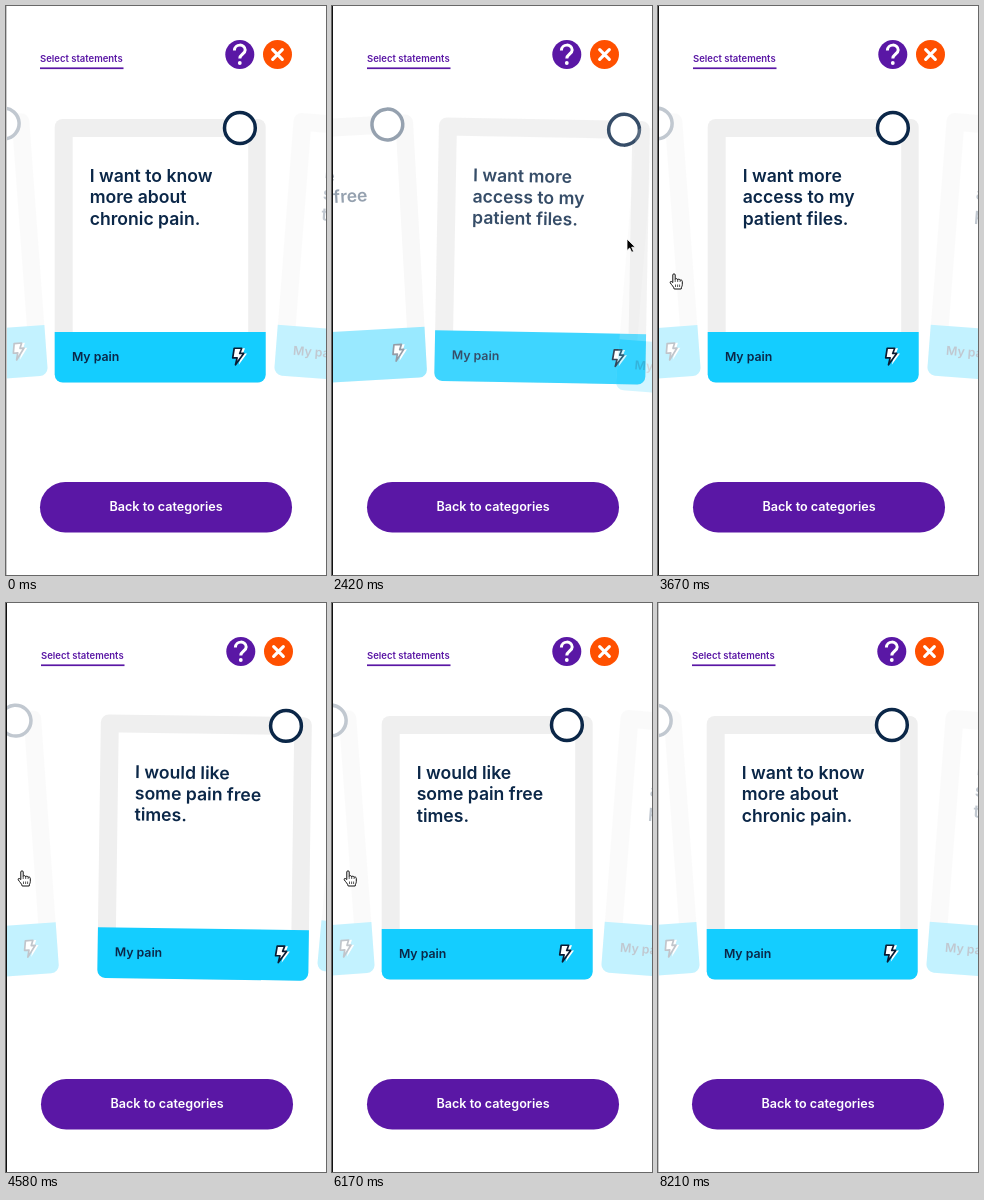
Write an HTML page that moves like this. It is 320 px wide and 569 px high and loops after 9000 ms.

```html
<!DOCTYPE html>
<html lang="en">
<head>
<meta charset="utf-8">
<title>Statement cards</title>
<style>
  html, body { margin: 0; width: 100%; height: 100%; overflow: hidden; background: #fff; }
  svg { display: block; width: 100vw; height: 100vh; }
  text { font-family: Inter, Roboto, sans-serif; font-weight: 600; }
</style>
</head>
<body>
<svg viewBox="0 0 320 569">
  <defs>
    <path id="bolt" d="M-4.5-8H3L1-2.8H5L-3.2 8.5L-1.6 1.6H-6Z" stroke-linejoin="round"/>
  </defs>
  <rect width="320" height="569" fill="#fff"/>
  <g id="app">
    <text x="34" y="56.3" font-size="9.5" fill="#5a17a5">Select statements</text>
    <rect x="34" y="61.4" width="83.5" height="1.7" fill="#5a17a5"/>
    <circle cx="233.8" cy="48.5" r="14.5" fill="#5a17a5"/>
    <path d="M228.4 44.6C228.4 37.4 239.2 37.4 239.2 44C239.2 48 233.8 48 233.8 52.6" fill="none" stroke="#fff" stroke-width="3"/>
    <circle cx="233.8" cy="57" r="1.9" fill="#fff"/>
    <circle cx="271.5" cy="48.5" r="14.5" fill="#ff5000"/>
    <path d="M266.7 43.7l9.6 9.6m0-9.6l-9.6 9.6" stroke="#fff" stroke-width="3.2" stroke-linecap="round"/>
    <g id="deck"></g>
    <rect x="34" y="476" width="252" height="50.5" rx="25.2" fill="#5a17a5"/>
    <text x="160" y="505.2" font-size="12.6" fill="#fff" text-anchor="middle">Back to categories</text>
  </g>
  <rect id="edge" width="1" height="569"/>
  <g id="cursor" stroke-linejoin="round">
    <path id="arrow" d="M0 0V11.5L2.7 9L4.7 13.3L6.6 12.4L4.7 8.2H8.3Z" fill="#000" stroke="#fff" stroke-width=".8"/>
    <g id="hand" fill="#fff" stroke="#111" stroke-width="1">
      <path d="M-1.2 1C-1.2-.6 1.2-.6 1.2 1V5.4C1.5 4.3 3.6 4.4 3.7 5.8C4.2 4.9 6 5 6.1 6.3C6.8 5.7 8.3 6 8.3 7.4V10.5C8.3 12.4 7.2 13 7.2 15H.2C-.4 12.4-2.3 11.2-3.6 9C-4.5 7.4-2.7 6.7-1.2 8.6Z"/>
      <path d="M1.2 5.4V8M3.7 5.8V8M6.1 6.3V8M1.5 10.5V13M3.6 10.5V13M5.6 10.5V13" fill="none" stroke-width=".7"/>
    </g>
  </g>
</svg>
<script>
const LOOP = 9000, SLIDE = 1000;
const CENTER = [154.2, 244.75];
const $ = id => document.getElementById(id);

const statements = [
  ['I feel', 'my pain', 'every day.'],
  ['I want to know', 'more about', 'chronic pain.'],
  ['I would like', 'some pain free', 'times.'],
  ['I want more', 'access to my', 'patient files.'],
  ['I want', 'advice on', 'pain relief.']
];

// Resting places, from hidden left to hidden right
const slots = [
  { x: -282, y: 1, r: -5, o: 0 },
  { x: -227, y: 1, r: -4.2, o: .25 },
  { x: 0, y: 0, r: 0, o: 1 },
  { x: 229, y: 1, r: 4.4, o: .25 },
  { x: 291, y: 63, r: 5, o: 0 }
];

// Each slide begins at `start` but is first seen at `shown`
const slides = [
  { start: 815, shown: 830, from: 1, to: 2 },
  { start: 2332.5, shown: 2380, from: 2, to: 3 },
  { start: 4395, shown: 4460, from: 3, to: 2 },
  { start: 6150, shown: 6290, from: 2, to: 1 }
];

const trips = [
  { start: 210, end: 380, path: [[142, 485], [235, 320], [295, 233]] },
  { start: 3200, end: 3670, path: [[295, 232], [225, 300], [16, 268]] },
  { start: 7800, end: 7890, path: [[16, 268], [80, 300], [141, 334]] }
];

const cardMarkup = lines => `
  <rect x="-105.5" y="-131.75" width="211" height="263.5" rx="8" fill="#efefef"/>
  <rect x="-87.5" y="-113.75" width="175.5" height="196" fill="#fff"/>
  <path d="M-105.5 81.25h211v42.5a8 8 0 0 1-8 8h-195a8 8 0 0 1-8-8Z" fill="#14cdff"/>
  ${lines.map((s, i) => `<text x="-70.5" y="${-68.5 + i * 21.2}" font-size="17.6" fill="#0b2748">${s}</text>`).join('')}
  <text x="-88.3" y="110" font-size="12.3" fill="#0b2748">My pain</text>
  <use href="#bolt" x="81.8" y="105.5" fill="#fff"/>
  <use href="#bolt" x="78.5" y="105.5" fill="#fff" stroke="#0b1c33" stroke-width="1.7"/>
  <circle cx="79.7" cy="-122.75" r="15.4" fill="#fff" stroke="#0b2748" stroke-width="3.5"/>`;

const cards = statements.map(lines => {
  const g = document.createElementNS('http://www.w3.org/2000/svg', 'g');
  g.innerHTML = cardMarkup(lines);
  $('deck').append(g);
  return g;
});

const mix = (a, b, k) => a + (b - a) * k;
const clamp = (v, lo, hi) => Math.min(hi, Math.max(lo, v));
const slotOf = d => slots[clamp(d, -2, 2) + 2];

function elastic(k) {
  if (k <= 0) return 0;
  if (k >= 1) return 1;
  return 1 + 2 ** (-10 * k) * Math.sin((k - .125) * 4 * Math.PI);
}

function drawCards(t) {
  const slide = slides.findLast(s => t >= s.shown) || { start: -SLIDE, from: 1, to: 1 };
  const k = elastic((t - slide.start) / SLIDE);
  cards.forEach((g, i) => {
    const a = slotOf(i - slide.from), b = slotOf(i - slide.to);
    const x = CENTER[0] + mix(a.x, b.x, k), y = CENTER[1] + mix(a.y, b.y, k);
    g.setAttribute('transform', `translate(${x} ${y}) rotate(${mix(a.r, b.r, k)})`);
    g.setAttribute('opacity', mix(a.o, b.o, clamp(k, 0, 1)));
  });
}

function drawCursor(t) {
  const visible = t >= 210 && t < 7920;
  $('cursor').setAttribute('display', visible ? 'inline' : 'none');
  if (!visible) return;
  const trip = trips.findLast(s => t >= s.start);
  const p = clamp((t - trip.start) / (trip.end - trip.start), 0, 1);
  const k = 1 - (1 - p) ** 2;
  const [x, y] = [0, 1].map(i => {
    const [a, b, c] = trip.path.map(q => q[i]);
    return mix(mix(a, b, k), mix(b, c, k), k);
  });
  // The pointer turns into an arrow while no card lies beneath it
  const uncovered = slides.some(s => t >= s.shown && t < s.start + 140);
  const arrow = p < 1 || uncovered || t >= 7800;
  $('cursor').setAttribute('transform', `translate(${x} ${y})`);
  $('arrow').setAttribute('display', arrow ? 'inline' : 'none');
  $('hand').setAttribute('display', arrow ? 'none' : 'inline');
}

function draw(t) {
  const shifted = t >= 830 && t < 6290;
  $('app').setAttribute('transform', `translate(${shifted ? 1 : 0} 0)`);
  $('edge').setAttribute('fill', shifted ? '#111' : '#c8c8c8');
  drawCards(t);
  drawCursor(t);
}

const begin = performance.now();
function tick() {
  draw((performance.now() - begin) % LOOP);
  requestAnimationFrame(tick);
}
tick();
</script>
</body>
</html>
```
